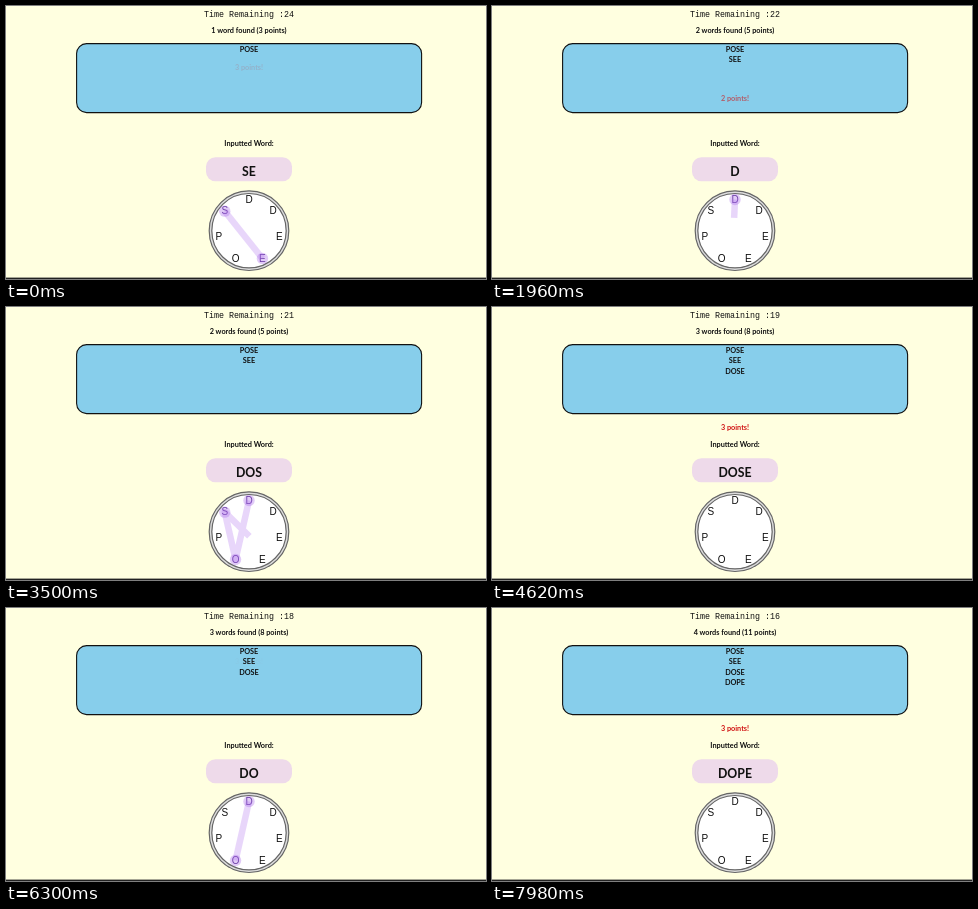
Recreate the animation shown at these times as an HTML page. Size 480x273 px, loop 8000 ms.

```html
<!DOCTYPE html>
<html lang="en">
<head>
<meta charset="utf-8">
<title>Word wheel</title>
<style>
  html, body { margin: 0; height: 100%; overflow: hidden; background: #ffffe0; }
  svg { display: block; width: 100vw; height: 100vh; }
  text { font: 700 7.3px Lato, sans-serif; text-anchor: middle; fill: #111; }
  #timer { font: 8.33px "Liberation Mono", monospace; }
  #word { font-size: 12.3px; }
  #letters text { font: 10px "Liberation Sans", sans-serif; }
  #letters .on { fill: #54308a; }
  #toast { fill: #d01010; }
  #trail { fill: none; stroke: #b478ee; stroke-opacity: .3; stroke-width: 6.5; stroke-linejoin: round; }
  #dots circle { fill: #a868e8; fill-opacity: .34; }
</style>
</head>
<body>
<svg viewBox="0 0 480 273">
  <rect width="480" height="273" fill="#ffffe0"/>
  <rect y="271.6" width="480" height="1.4" fill="#222"/>
  <text id="timer" x="243" y="11"></text>
  <text id="count" x="243" y="27"></text>
  <rect x="70.6" y="37.6" width="345" height="69" rx="10" fill="#87ceeb" stroke="#111" stroke-width="1.1"/>
  <g id="list"></g>
  <text id="toast" x="243"></text>
  <text x="243" y="140.3">Inputted Word:</text>
  <rect x="200" y="151.3" width="86" height="24" rx="9.5" fill="#eedaea"/>
  <text id="word" x="243" y="170.4"></text>
  <circle cx="243" cy="224.7" r="38.5" fill="#fff" stroke="#ddd" stroke-width="3"/>
  <circle cx="243" cy="224.7" r="39.8" fill="none" stroke="#666" stroke-width="1.2"/>
  <circle cx="243" cy="224.7" r="37.2" fill="none" stroke="#666" stroke-width="1.2"/>
  <g id="letters"></g>
  <path id="trail"/>
  <g id="dots"></g>
</svg>
<script>
const LOOP = 8000, TOAST_DELAY = 280, TOAST_TIME = 2000;
const $ = id => document.getElementById(id);

const nodes = [..."DDEEOPS"].map((letter, i) => {
  const a = i * 2 * Math.PI / 7;
  return { letter, x: 243 + 31 * Math.sin(a), y: 224.5 - 31 * Math.cos(a) };
});

// Each stop: node, arrival, departure, sideways bend of the stroke that follows.
const rounds = [
  { word: "POSE", points: 3, end: -1780, stops: [] },
  { word: "SEE", points: 2, end: 800, stops: [[6, -1000, -800], [3, -300, 110], [2, 500, 800]] },
  { word: "DOSE", points: 3, end: 4200, stops: [[0, 1650, 1780, 4], [4, 2280, 2550], [6, 3050, 3240, 4.3], [3, 3720, 4200]] },
  { word: "DOPE", points: 3, end: 7700, stops: [[0, 5220, 5450], [4, 5950, 6350], [5, 6700, 6880], [3, 7400, 7700]] }
];

function add(parent, tag, attrs, text = "") {
  const el = document.createElementNS("http://www.w3.org/2000/svg", tag);
  for (const k in attrs) el.setAttribute(k, attrs[k]);
  el.textContent = text;
  return parent.appendChild(el);
}

const letters = nodes.map(n => add($("letters"), "text", { x: n.x, y: n.y + 3.1 }, n.letter));
const dots = nodes.map(n => add($("dots"), "circle", { cx: n.x, cy: n.y, r: 5.7 }));
const rows = rounds.map((r, i) => add($("list"), "text", { x: 243, y: 45.5 + 10.5 * i }, r.word));

function pointer(stops, t) {
  const i = stops.findLastIndex(s => t >= s[1]);
  const [from, , leave, bend = 0] = stops[i];
  const a = nodes[from], next = stops[i + 1];
  if (!next || t < leave) return a;
  const b = nodes[next[0]], u = (t - leave) / (next[1] - leave), q = u * u * (3 - 2 * u);
  const dx = b.x - a.x, dy = b.y - a.y, side = bend * Math.sin(Math.PI * q) / Math.hypot(dx, dy);
  return { x: a.x + dx * q + dy * side, y: a.y + dy * q - dx * side };
}

function showToast(last, t) {
  const u = Math.min(1, Math.max(0, (t - last.end - TOAST_DELAY) / TOAST_TIME));
  const p = (1 - Math.cos(Math.PI * u)) / 2;
  $("toast").textContent = last.points + " points!";
  $("toast").setAttribute("y", 123.4 - 69 * p);
  $("toast").setAttribute("opacity", 1 - p);
}

function draw(t) {
  $("timer").textContent = "Time Remaining :" + (24 - Math.floor((t + 440) / 1000));

  const found = rounds.filter(r => t >= r.end);
  const total = found.reduce((sum, r) => sum + r.points, 0);
  $("count").textContent = `${found.length} word${found.length > 1 ? "s" : ""} found (${total} points)`;
  rows.forEach((row, i) => row.setAttribute("visibility", i < found.length ? "visible" : "hidden"));
  showToast(found.at(-1), t);

  const active = rounds.find(r => t < r.end && r.stops.length && t >= r.stops[0][1]);
  const hit = active ? active.stops.filter(s => t >= s[1]).map(s => s[0]) : [];
  $("word").textContent = active ? active.word.slice(0, hit.length) : found.at(-1).word;
  nodes.forEach((n, i) => {
    const on = hit.includes(i);
    letters[i].classList.toggle("on", on);
    dots[i].setAttribute("visibility", on ? "visible" : "hidden");
  });
  const line = active ? [...hit.map(i => nodes[i]), pointer(active.stops, t)] : [];
  $("trail").setAttribute("d", line.map((p, i) => `${i ? "L" : "M"}${p.x} ${p.y}`).join(""));
}

const start = performance.now();
function frame() {
  draw((performance.now() - start) % LOOP);
  requestAnimationFrame(frame);
}
frame();
</script>
</body>
</html>
```
